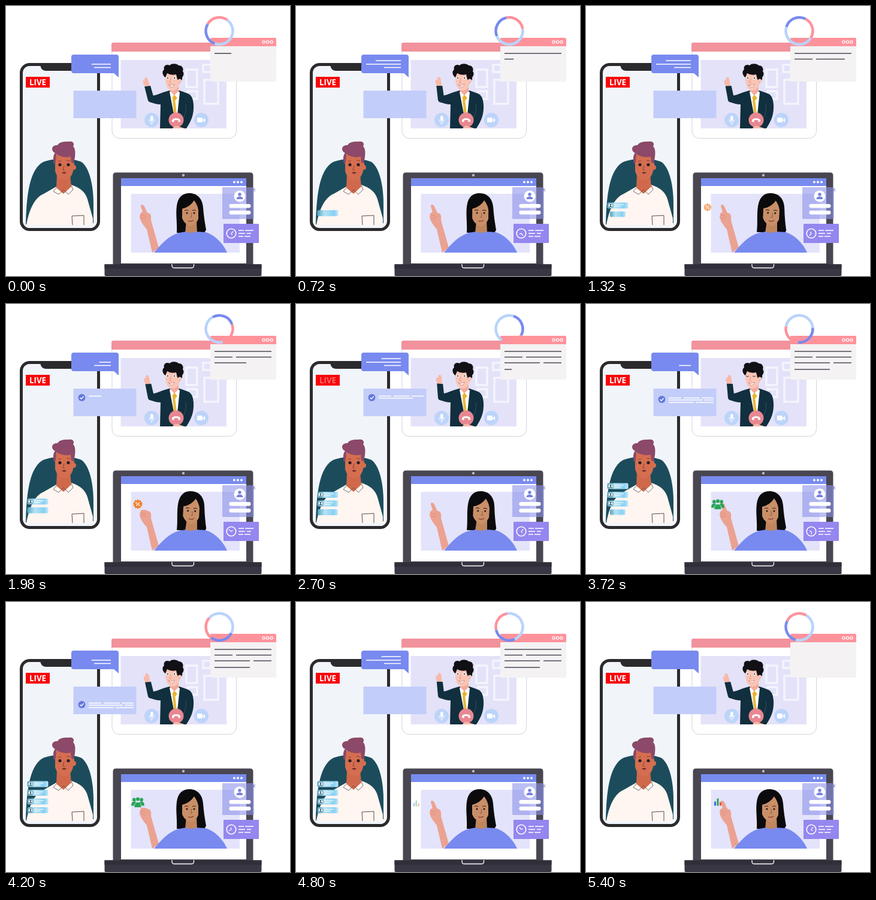
An HTML page for the animation above (5.46 s loop, 474 by 450 pixels).

```html
<!DOCTYPE html>
<html lang="en">
<head>
<meta charset="utf-8">
<title>Video calls</title>
<style>
html,body{margin:0;width:100%;height:100%;overflow:hidden;background:#fff}
svg{display:block;width:474px;height:450px}
.ln{fill:none;stroke-width:1.6}
</style>
</head>
<body>
<svg viewBox="0 0 474 450">
<defs>
  <linearGradient id="chip"><stop offset="0" stop-color="#4fa3c1"/><stop offset=".35" stop-color="#b4e2f3"/><stop offset=".8" stop-color="#86d0f3"/><stop offset="1" stop-color="#c5e8f8"/></linearGradient>
  <clipPath id="call"><rect x="191.500" y="90" width="176.500" height="114"/></clipPath>
  <clipPath id="phone"><rect x="28" y="98" width="124" height="272" rx="12"/></clipPath>
  <clipPath id="card"><rect x="113" y="141" width="104" height="46"/></clipPath>
</defs>

<!-- call window -->
<rect x="177" y="61.500" width="207.500" height="159" rx="12" fill="#fff" stroke="#d2d2df"/>
<path d="M176 76V64q0-3 3-3H385V76Z" fill="#f1929c"/>
<rect x="191.500" y="90" width="176.500" height="114" fill="#e3e2f9"/>
<g fill="none" stroke="#f4f4fd" stroke-width="3.500">
  <rect x="301" y="106" width="18" height="29"/><rect x="329" y="98" width="13" height="12"/>
  <rect x="331" y="123" width="23" height="40"/><rect x="303" y="142" width="16" height="13"/>
</g>
<g clip-path="url(#call)">
  <g id="wave">
    <path d="M236 134C232 130 232 126 233 122L235 124 236 119 239 118 241 121 242 127Q243 131 242 135Z" fill="#f8b9a8"/>
    <path d="M234 133L244 133 247 152 246 160Q239 162 237 157Z" fill="#112f3e"/>
  </g>
  <path d="M243 150Q253 148 262 144L272 141H290L304 146Q312 149 313 164C314 181 309 192 301 204H257L258 164Q249 164 238 159Z" fill="#112f3e"/>
  <path d="M273 143L278 140H286L290 144 285 190H282Z" fill="#fff"/>
  <path d="M280 147L284 151 282 155 286 189 282 195 278 157Z" fill="#e8b83e"/>
  <path d="M277 153L281 149 286 153 282 158Z" fill="#eab32d"/>
  <path d="M300 164Q302 175 296 187" fill="none" stroke="#31505d"/>
  <path d="M275 133H288V142L281 149 274 142Z" fill="#f3aa9b"/>
  <path d="M267 111Q276 106 288 110L291 124Q289 141 277 141 267 139 266 123Z" fill="#f9c5b6"/>
  <path d="M266 119C262 117 259 109 264 106 262 100 268 96 273 99 277 95 285 96 288 99 294 99 297 104 295 109 298 112 296 117 294 119 295 123 292 126 290 128L286 122 284 114Q275 116 269 112Z" fill="#101015"/>
  <circle cx="290" cy="124.500" r="3" fill="#f9c5b6"/>
  <g id="eyes"><circle cx="270" cy="120" r="2.300" fill="#fff"/><circle cx="281" cy="120" r="2.300" fill="#fff"/><circle cx="270" cy="120" r="1.100"/><circle cx="281" cy="120" r="1.100"/></g>
  <path id="lids" d="M267 120q3 2 5 0M278 120q3 2 5 0" fill="none" stroke="#40333a"/>
  <path d="M275 121L273 128H276" fill="none" stroke="#e99386"/>
  <path d="M271 131Q276 134 281 130 280 136 275 135Z" fill="#fff" stroke="#b65f59" stroke-width=".6"/>
</g>
<g fill="#bdd4f9"><circle cx="243" cy="190" r="12"/><circle cx="326" cy="190" r="12"/></g>
<circle cx="284" cy="190" r="12.500" fill="#e88791"/>
<path d="M277 193Q276 187 284 187T291 193L287.500 193.500V190.500Q284 189.500 280.500 190.500V193.500Z" fill="#fff"/>
<path d="M278 204Q281 199 286 200L298 204Z" fill="#f6b8a8"/>
<rect x="241" y="183" width="4.500" height="9" rx="2.200" fill="#fff"/>
<path d="M239 189q1 6 4 6t5-6M243 195v3" fill="none" stroke="#fff"/>
<rect x="319" y="186" width="9" height="8" rx="1.500" fill="#fff"/><path d="M328 190l4-3v7Z" fill="#fff"/>

<!-- phone -->
<rect x="25.500" y="97.500" width="129" height="275" rx="14" fill="#f1f5fa" stroke="#2b2a2c" stroke-width="5"/>
<path d="M57 97H124Q122 108 115 108H66Q58 108 57 97Z" fill="#2b2a2c"/>
<g clip-path="url(#phone)">
  <path d="M33 364C34 312 40 272 62 260 80 253 110 253 126 260 140 270 146 301 146 330V362Z" fill="#1c4c5b"/>
  <path d="M34 365C38 343 46 320 63 313L84 301 109 298Q131 305 136 322L145 354V365Z" fill="#fff6f1"/>
  <path d="M85 281H107L109 301 96 313 84 303Z" fill="#d0694b"/>
  <path d="M82 248L109 244 114 263Q112 288 99 290 86 290 82 275Z" fill="#d56e50"/>
  <circle cx="113" cy="269" r="4" fill="#d56e50"/>
  <path d="M80 263C78 254 79 248 82 245 74 241 76 231 86 232 89 226 98 226 104 226 114 224 114 231 112 234 117 238 116 250 113 262L109 261 108 251Q96 254 84 247L83 261Z" fill="#8c4969"/>
  <circle cx="90" cy="264.500" r="2.600" fill="#291d23"/><circle cx="104" cy="264.500" r="2.600" fill="#291d23"/>
  <path d="M87 259l5-1M101 257l6 1M97 266l-2 7 3 1" fill="none" stroke="#8b3f38"/>
  <path d="M93 278q4-3 8 0-4 3-8 0" fill="#742e2d"/>
  <path d="M84 303L79 309 88 314 96 306 104 314 112 306 109 299" fill="none" stroke="#5b4c4c" stroke-width=".8"/>
  <path d="M111 365L110 350 130 349V365" fill="none" stroke="#443b3e" stroke-width=".9"/>
  <g id="chips"></g>
</g>
<rect x="33" y="118" width="40" height="18" fill="#f80509"/>
<text id="live" x="53" y="132" text-anchor="middle" font-family="'Open Sans','Noto Sans',sans-serif" font-size="13.300" font-weight="700" fill="#fff">LIVE</text>

<!-- message bubble and note -->
<path d="M113 81H184Q188 81 188 85V119L180 112H113Q109 112 109 108V85Q109 81 113 81Z" fill="#788aef"/>
<path id="talk" class="ln" stroke="#fff"/>
<rect x="112.500" y="141" width="105" height="46" fill="#c3cdf9"/>
<g clip-path="url(#card)"><g id="note">
  <circle cx="126.500" cy="156" r="6" fill="#6378dc"/><path d="M123.500 156l2.200 2.300 4-4.300" fill="none" stroke="#fff" stroke-width="1.300"/>
  <path id="noteText" class="ln" stroke="#fff"/>
</g></g>

<!-- text window and ring -->
<rect x="341" y="53" width="110" height="73" rx="2" fill="#f4f2f3"/>
<path d="M341 67V55q0-2 2-2H449q2 0 2 2V67Z" fill="#ff929b"/>
<g fill="none" stroke="#fff" stroke-width="1.200"><circle cx="430" cy="60" r="2.200"/><circle cx="436.500" cy="60" r="2.200"/><circle cx="443" cy="60" r="2.200"/></g>
<path id="page" class="ln" stroke="#4c4b55"/>
<g id="ring" fill="none" stroke-width="4.500"></g>

<!-- laptop -->
<path d="M178.500 431V282.500q0-5 5-5H407.500q5 0 5 5V431Z" fill="#484650"/>
<circle cx="296" cy="282" r="2" fill="#e8e8ee"/><circle cx="296" cy="282" r=".8" fill="#555"/>
<rect x="192" y="287" width="209" height="142" fill="#fff"/>
<rect x="192" y="287" width="209" height="13" fill="#788bee"/>
<g fill="#fff"><circle cx="381" cy="293.500" r="2"/><circle cx="387" cy="293.500" r="2"/><circle cx="393" cy="293.500" r="2"/></g>
<rect x="208.500" y="313" width="181.500" height="98" fill="#e3e3fb"/>
<g fill="#eba291" transform="translate(-1 0)">
  <path id="finger" d="M226 334Q226 331 228 331 230 331 232 334L239 350H231Z"/>
  <path d="M225 346Q229 342 233 343L241 346Q244 349 243 357L256 403 245 411 236 372Q226 361 224 352Z"/>
  <path d="M226 348l9 3M226 353l8 2" stroke="#d98a7b" stroke-width=".8"/>
</g>
<g id="head">
  <path d="M285 378C286 362 283 347 285 333 287 318 295 312 306 312 320 312 328 322 329 336 330 350 332 362 334 373L331 378Z" fill="#0b0a0c"/>
  <path d="M301 357H318L319 379H299Z" fill="#c0875f"/>
  <path d="M294 338Q307 335 314 324 320 332 321 340L321 355Q318 363 309 367 298 364 294 354Z" fill="#c98f68"/>
  <path d="M298 341q3-2 6 0M311 341q3-2 6 0" fill="none" stroke="#442a22" stroke-width="1.200"/>
  <circle cx="302" cy="345" r="1.500" fill="#231917"/><circle cx="314" cy="345" r="1.500" fill="#231917"/>
  <path d="M309 345l1 7h-3" fill="none" stroke="#965b3e"/><path d="M304 358q5 2 9-1" fill="none" stroke="#8b3c35" stroke-width="1.300"/>
</g>
<path d="M247 411C259 397 272 382 289 378L300 376Q308 380 318 376L333 377C350 382 363 397 369 411Z" fill="#788aef"/>
<g id="badge"><circle r="6.300" fill="#f17b22" stroke="#f17b22" stroke-width="2.500" stroke-dasharray="2.500 1.460"/><path d="M-3 3L3-3" stroke="#fff" stroke-width="1.200"/><circle cx="-2.400" cy="-2" r="1.200" fill="none" stroke="#fff"/><circle cx="2.400" cy="2" r="1.200" fill="none" stroke="#fff"/></g>
<g id="team" fill="#27a455"><circle cx="-6" cy="-4" r="3"/><circle cx="6" cy="-4" r="3"/><path d="M-11 6Q-11-1-6-1T-1 6ZM1 6Q1-1 6-1T11 6Z"/><g stroke="#e3e3fb" stroke-width=".8"><circle cy="-5" r="3.500"/><path d="M-6 9Q-6 0 0 0T6 9Z"/></g></g>
<g id="chart"><path d="M-6-1h3V6h-3Z" fill="#356fe0"/><path d="M-1.500-6h3V6h-3Z" fill="#26a555"/><path d="M3 0h3V6h-3Z" fill="#ea5746"/></g>
<path d="M164.500 430.500H426.500V448q0 2-2 2H166.500q-2 0-2-2Z" fill="#393743"/>
<path d="M164.500 430.500H426.500V438H164.500Z" fill="#302f39"/>
<path d="M277 430V433q0 3.500 4 3.500H309.500q4 0 4-3.500V430" fill="#363541" stroke="#fff" stroke-width="1.300"/>

<!-- profile and timer cards -->
<rect x="361" y="302" width="53" height="53" rx="1" fill="#8e93e9" opacity=".6"/>
<path d="M412 304l4 5M416 304l-4 5" stroke="#7e83bd"/>
<circle cx="390" cy="317" r="9.500" fill="#fff"/>
<g fill="#7782dc"><circle cx="390" cy="314" r="2.700"/><path d="M384.500 322Q384.500 317.500 390 317.500T395.500 322Z"/></g>
<g fill="#fff"><rect x="372.500" y="330" width="36" height="6.500" rx="3"/><rect x="372.500" y="341" width="36" height="6.500" rx="3"/></g>
<rect x="363" y="363" width="59" height="32" rx="1" fill="#9487ef"/>
<circle cx="376" cy="379" r="7.800" fill="none" stroke="#fff" stroke-width="1.600"/>
<path id="hand" d="M376 374V379L379 380" fill="none" stroke="#fff" stroke-width="1.200"/>
<path d="M388 374H397M399 374H413M388 379H399M402 379H409M388 384H396M398 384H408" stroke="#fff" stroke-width="1.300"/>
</svg>
<script>
const LOOP = 5460, STEP = 60;
const $ = id => document.getElementById(id);
const set = (id, k, v) => $(id).setAttribute(k, v);
const clamp = v => Math.max(0, Math.min(1, v));
const ramp = (t, a, b) => clamp((t - a) / (b - a));
const ease = x => x * x * (3 - 2 * x);
const hump = (t, mid, half) => ease(clamp(1 - Math.abs(t - mid) / half));

// linear interpolation through t,v pairs
function key(t, k) {
  for (let i = 2; i < k.length; i += 2)
    if (t < k[i]) return k[i - 1] + (k[i + 1] - k[i - 1]) * (t - k[i - 2]) / (k[i] - k[i - 2]);
  return k[k.length - 1];
}

// path for text rows typed left to right; each row is [y, from, to, from, to, ...]
function typed(rows, px) {
  let d = "";
  for (const [y, ...s] of rows) {
    const start = s[0], width = s[s.length - 1] - start;
    for (let i = 0; i < s.length; i += 2) {
      const end = Math.min(s[i + 1], start + px);
      if (end > s[i]) d += `M${s[i]} ${y}H${end}`;
    }
    px -= width;
    if (px <= 0) break;
  }
  return d;
}

// ring pieces: colour, start and end angle, clockwise from the top
const polar = a => `${356 + 22.5 * Math.sin(a * Math.PI / 180)} ${41.5 - 22.5 * Math.cos(a * Math.PI / 180)}`;
$("ring").innerHTML = [["#ff929b", -60, 35], ["#b9d3fb", 35, 200], ["#788aef", 200, 300]]
  .map(([c, a, b]) => `<path stroke="${c}" d="M${polar(a)}A22.5 22.5 0 0 1 ${polar(b)}"/>`).join("");

const chipTimes = [60, 1200, 2540, 3600], moves = [[600, 1140], [1800, 2400], [3000, 3540]];
$("chips").innerHTML = chipTimes.map((_, i) => `<g id="chip${i}"><rect x="-17.500" y="-5" width="35" height="10" rx="2" fill="url(#chip)"/>
  <g id="face${i}"><path d="M-6-1.500H10M-6 1.500H5" stroke="#fff" stroke-width="1.200"/><circle cx="-12" r="4" fill="#fff" stroke="#397f9b" stroke-width=".8"/><circle cx="-12" cy="-1.200" r="1.400" fill="#28566b"/><path d="M-14.500 2.500q2.500-4 5 0Z" fill="#28566b"/></g></g>`).join("");

const page = [[79, 348, 443], [88.5, 348, 378, 384, 443], [98, 348, 407, 413, 443], [109, 348, 407]];
const note = [[153.5, 138, 159, 163, 190, 193, 213], [157, 138, 195, 198, 213], [161, 138, 180, 183, 213]];

function talk(t) {
  const p = (t + 600) % 2100;
  return [[102.5, 28, 0, 170], [97, 58, 300, 840], [91, 42, 860, 1300]]
    .map(([y, w, a, b]) => p > a ? `M${175 - w * ramp(p, a, b)} ${y}H175` : "").join("");
}

function icon(id, t, from, hold, out) {
  const go = ease(ramp(t, from, hold)), gone = ramp(t, out, out + 180);
  const on = t >= from && t < out + 180;
  set(id, "opacity", on ? Math.min(go * 3, 1) * (1 - gone) : 0);
  set(id, "transform", `translate(${198 + 22 * go} ${336 - 2.5 * go}) scale(${.8 + .2 * go})`);
}

function draw(t) {
  const clear = t >= 5100;
  set("ring", "transform", `rotate(${t / LOOP * 360} 356 41.5)`);
  set("wave", "transform", `rotate(${-5 * Math.cos(t / 1092 * 2 * Math.PI) - 2} 242 157)`);
  const blink = t >= 3660 && t < 3780;
  set("eyes", "opacity", blink ? 0 : 1);
  set("lids", "opacity", blink ? 1 : 0);
  set("live", "opacity", 1 - .6 * hump(t, 2700, 300));

  set("talk", "d", clear ? "" : talk(t));
  set("page", "d", clear ? "" : typed(page, key(t, [0, 28, 1320, 179, 1980, 243, 2700, 297, 3400, 344])));
  const noteOn = t >= 1740 && t < 4800;
  set("note", "opacity", noteOn ? ramp(t, 1680, 1860) : 0);
  set("note", "transform", `translate(0 ${key(t, [0, 0, 3540, 0, 3720, 3, 4200, 15, 4800, 34])})`);
  set("noteText", "d", typed(note, key(t, [1800, 0, 1980, 21, 2700, 132, 3400, 225])));

  chipTimes.forEach((start, i) => {
    let y = 347;
    moves.forEach(([a, b], n) => { if (n >= i) y -= 14.5 * ease(ramp(t, a, b)); });
    const grow = ease(ramp(t, start, start + 180));
    const faceAt = i < 3 ? moves[i][0] + 360 : 3960;
    set("chip" + i, "transform", `translate(53 ${y}) scale(${grow} ${.6 + .4 * grow})`);
    set("chip" + i, "opacity", t < start ? 0 : 1 - ramp(t, 4860, 5100));
    set("face" + i, "opacity", ramp(t, faceAt, faceAt + 120));
  });

  const tilt = ease(ramp(t, 600, 1200)) * (1 - ease(ramp(t, 2900, 3500)));
  set("head", "transform", `rotate(${3 * tilt} 308 378)`);
  const tap = Math.max(hump(t, 2000, 360), hump(t, 4230, 360));
  set("finger", "transform", `translate(0 ${350 * .65 * tap}) scale(1 ${1 - .65 * tap})`);
  icon("badge", t, 1140, 1740, 2280);
  icon("team", t, 3000, 3540, 4440);
  icon("chart", t, 4680, 5220, LOOP);
  set("hand", "transform", `rotate(${45 + t / LOOP * 720} 376 379)`);
}

const begin = performance.now();
function tick() {
  const t = (performance.now() - begin) % LOOP;
  draw(Math.floor(t / STEP) * STEP);
  requestAnimationFrame(tick);
}
tick();
</script>
</body>
</html>
```
